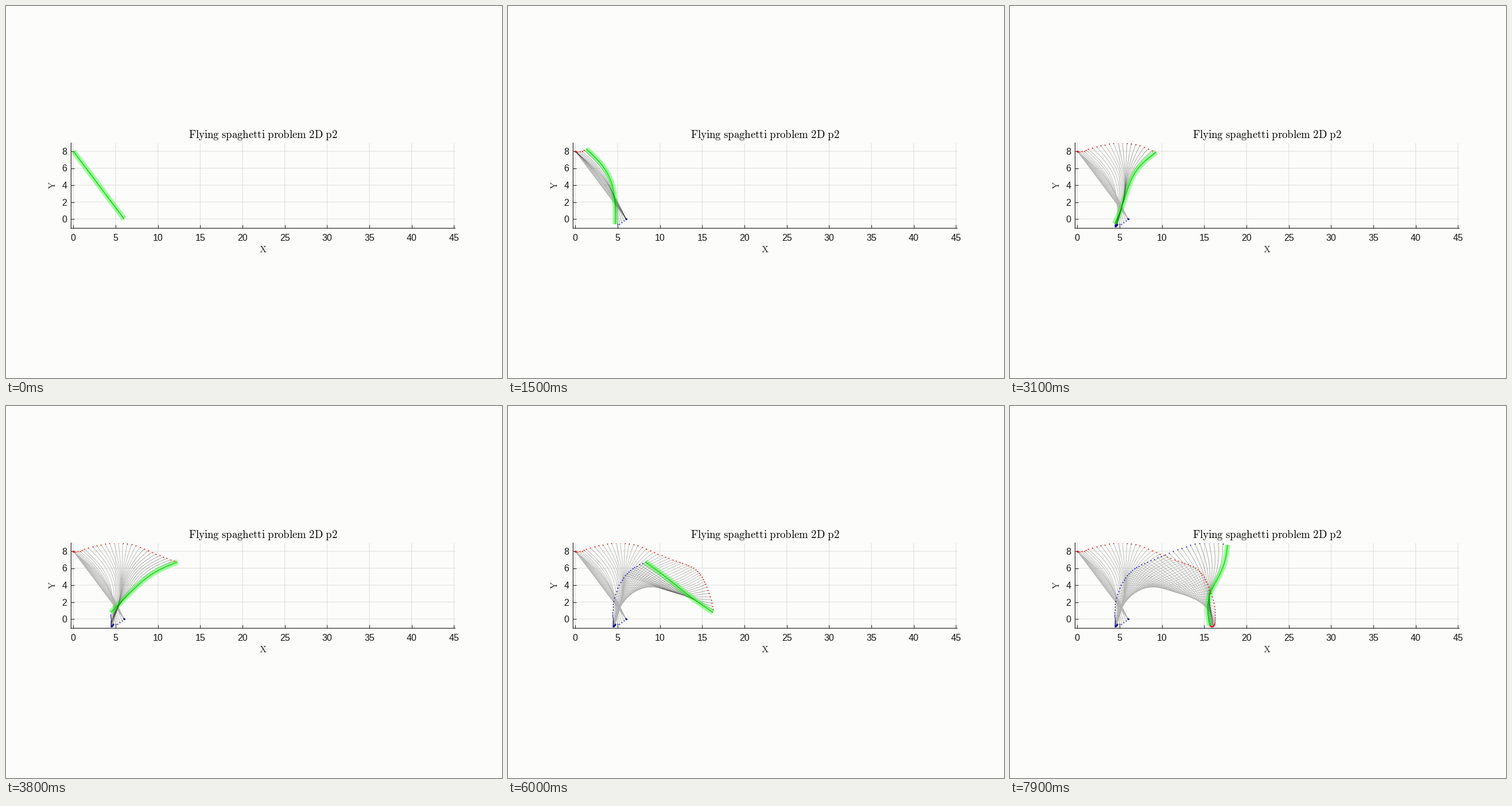
Write a matplotlib script that moves like this. It is 864 px wide and 648 px high and loops after 8000 ms.

```python
import numpy as np
import matplotlib.pyplot as plt
from matplotlib.animation import FuncAnimation
from matplotlib.collections import LineCollection

W, H = 864, 648
FRAMES, STEP_MS = 80, 100
LENGTH = 10
LAUNCH, BENT = 10, 15  # steps at which the rod leaves and is fully bowed
RECENT = 9  # newest trail rods, still translucent
INK = "#262626"
U = np.linspace(0, 1, 60)[:, None]

plt.rcParams.update({
    "font.family": "Liberation Sans",
    "mathtext.fontset": "cm",
    "axes.edgecolor": INK,
})


def modes(t):
    """First and second bending amplitude: a decaying oscillation."""
    p = max(t, BENT)
    w = 2 * np.pi * (p - 17) / 34
    grow = min(1, t / BENT) ** 1.5
    a = .15 + (1.4 - .008 * p) * np.cos(w)
    b = .0065 * (p - 38) + .22 * np.cos(w + .3)
    return grow * a, grow * b


def rod(t):
    """Points of the tumbling rod, head first."""
    tau = max(0, t - LAUNCH)
    phi = np.arctan2(-6, 8) + np.radians(3.13 * tau + .0028 * tau ** 2)
    x = max(3, 2.2 + .208 * tau + .35 * np.sin(2 * phi))
    y = 4 + min(1, tau / 3) * (.38 * np.cos(4 * phi) - .28 * np.cos(2 * phi))

    # The bow shortens the chord so that the arc keeps its length
    a, b = modes(t)
    half = LENGTH / 2
    chord = half + np.sqrt(half ** 2 - np.pi ** 2 * (a * a + 4 * b * b) / 4)
    along = np.array([-np.sin(phi), -np.cos(phi)])
    normal = np.array([-along[1], along[0]])
    bow = a * np.sin(np.pi * U) + b * np.sin(2 * np.pi * U)
    return np.array([x, y]) + (U - .5) * chord * along + bow * normal


rods = np.array([rod(t) for t in range(FRAMES)])

# 72 dpi makes one point equal one pixel
fig = plt.figure(figsize=(W / 72, H / 72), dpi=72, facecolor="#fcfcfa")
left, right, top, bottom = 113.4, 782.5, 238.5, 387.2
ax = fig.add_axes([left / W, 1 - bottom / H, (right - left) / W, (bottom - top) / H])
ax.set_facecolor("none")
ax.set_xlim((left - 117.3) / 14.735, (right - 117.3) / 14.735)
ax.set_ylim((371 - bottom) / 14.75, (371 - top) / 14.75)
ax.set_xticks(range(0, 46, 5))
ax.set_yticks(range(0, 9, 2))
ax.spines[["top", "right"]].set_visible(False)
ax.spines[["left", "bottom"]].set_linewidth(1.2)
ax.tick_params(direction="in", length=6, width=1, color=INK,
               labelcolor="#161616", labelsize=16)
ax.tick_params(axis="x", pad=10)
ax.tick_params(axis="y", pad=7)
ax.grid(color="#dededa", lw=1)
ax.set_axisbelow(True)
for line in (*ax.get_xgridlines(), *ax.get_ygridlines(), *ax.spines.values()):
    line.set_snap(False)


def label(x, y, text, size, color=INK, **kw):
    fig.text(x / W, 1 - y / H, rf"$\mathrm{{{text}}}$", size=size, color=color,
             ha="center", va="baseline", rotation_mode="anchor", **kw)


label(447.5, 229.8, r"Flying\ spaghetti\ problem\ 2D\ p2", 18.7, "black")
label(447.5, 428.7, "X", 16)
label(86.5, 312.5, "Y", 16, rotation=90)


def trail(color, width, z):
    return ax.add_collection(
        LineCollection([], colors=[color], lw=width, zorder=z), autolim=False)


def dots(color):
    return ax.plot([], [], ls="", marker="s", ms=1.7, mew=0, color=color, zorder=6)[0]


old = trail("#b4b4b4", .85, 3)
fresh = trail((0, 0, 0, .35), .9, 4)
glow = [ax.plot([], [], color=c, lw=w, alpha=a, zorder=5, solid_capstyle="butt")[0]
        for c, w, a in (("#00ff00", 10, .3), ("#00ff00", 6, .18), ("#00b400", 1, 1))]
head_dots, tail_dots = dots("#d80000"), dots("#0000a0")


def draw(k):
    cut = max(0, k - RECENT)
    old.set_segments(rods[:cut])
    fresh.set_segments(rods[cut:k])
    for line in glow:
        line.set_data(*rods[k].T)
    head_dots.set_data(*rods[:k, 0].T)
    tail_dots.set_data(*rods[:k, -1].T)
    return [old, fresh, *glow, head_dots, tail_dots]


anim = FuncAnimation(fig, draw, frames=FRAMES, interval=STEP_MS,
                     repeat=True, repeat_delay=0, blit=False)
plt.show()
```
